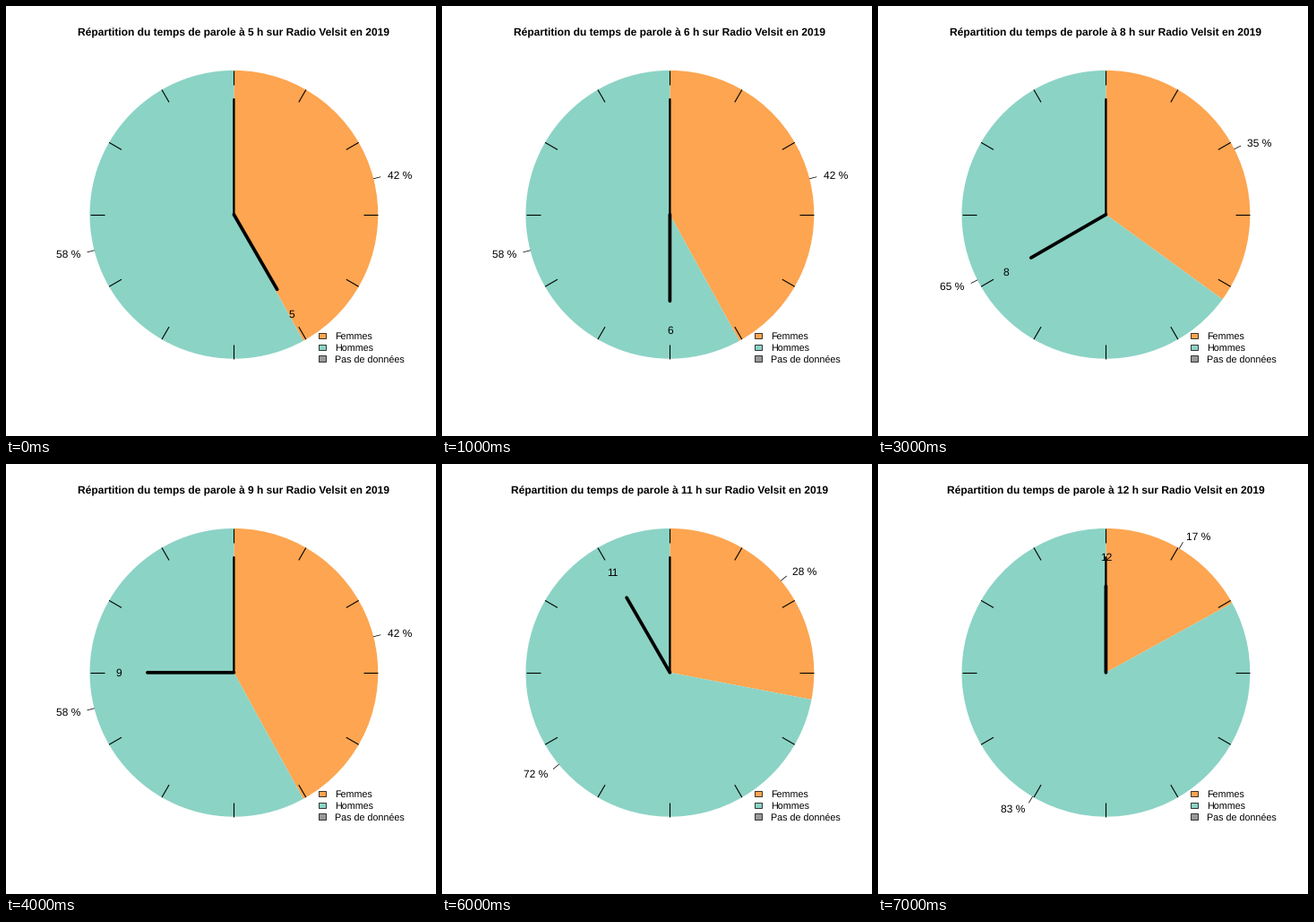
Animation of 480x480 px, one loop 8 s. Source, as a matplotlib script:

```python
import numpy as np
import matplotlib.pyplot as plt
from matplotlib.animation import FuncAnimation
from matplotlib.patches import Rectangle, Wedge

SIZE, DPI = 480, 100
PT = 72 / DPI  # points per pixel
CX, CY, R = 254.4, SIZE - 232.8, 160.9
ORANGE, TEAL, GREY = "#fda550", "#8bd3c5", "#999999"
FIRST_HOUR = 5
WOMEN = [42, 42, 36, 35, 42, 34, 28, 17]  # percent, one value per hour

plt.rcParams.update({"font.family": "Liberation Sans", "text.hinting": "none"})
fig = plt.figure(figsize=(SIZE / DPI, SIZE / DPI), dpi=DPI, facecolor="white")
ax = fig.add_axes([0, 0, 1, 1])
ax.set_xlim(0, SIZE)
ax.set_ylim(0, SIZE)
ax.axis("off")


def polar(turn, radius):
    """Point at a clockwise turn from the top, radius in units of the pie."""
    a = 2 * np.pi * turn
    return CX + R * radius * np.sin(a), CY + R * radius * np.cos(a)


def spoke(turn, inner, outer):
    return list(zip(polar(turn, inner), polar(turn, outer)))


def add_line(width, turn=0, inner=0, outer=1, cap="round", **kw):
    return ax.plot(*spoke(turn, inner, outer), color="black", lw=width * PT,
                   solid_capstyle=cap, **kw)[0]


def add_text(x, y, text="", size=12, **kw):
    return ax.text(x, y, text, fontsize=size * PT, va="baseline", **kw)


def add_wedge(color):
    wedge = Wedge((CX, CY), R, 0, 90, facecolor=color, lw=0)
    return ax.add_patch(wedge)


women, men = add_wedge(ORANGE), add_wedge(TEAL)
leaders = [add_line(0.75) for _ in range(2)]
shares = [add_text(0, 0, ha=side) for side in ("left", "right")]

for k in range(12):
    add_line(1.1, k / 12, 0.9, 1, cap="butt")
add_line(2.3, 0, 0, 0.8, snap=False)
hour_hand = add_line(3.75, 0, 0, 0.6, snap=False)
hour_label = add_text(0, 0, ha="center")
title = add_text(CX, SIZE - 34, ha="center", weight="bold")

legend = [(ORANGE, "Femmes"), (TEAL, "Hommes"), (GREY, "Pas de données")]
for i, (color, name) in enumerate(legend):
    y = SIZE - 367.8 - 12.96 * i
    ax.add_patch(Rectangle((349.3, y - 3.25), 7.8, 6.5, facecolor=color,
                           edgecolor="black", lw=0.75 * PT))
    add_text(366.8, y - 4, name, size=10.8)


def update(i):
    hour, pct = FIRST_HOUR + i, WOMEN[i]
    split = 90 - 3.6 * pct
    women.set_theta1(split)
    women.set_theta2(90)
    men.set_theta1(90)
    men.set_theta2(split + 360)

    middle = pct / 200
    for line, label, turn, value in zip(leaders, shares,
                                        (middle, middle + 0.5),
                                        (pct, 100 - pct)):
        line.set_data(*spoke(turn, 1, 1.05))
        x, y = polar(turn, 1.1)
        label.set_position((x, y - 4))
        label.set_text(f"{value} %")

    hour_hand.set_data(*spoke(hour / 12, 0, 0.6))
    x, y = polar(hour / 12, 0.8)
    hour_label.set_position((x, y - 4))
    hour_label.set_text(str(hour))
    title.set_text(f"Répartition du temps de parole à {hour} h "
                   "sur Radio Velsit en 2019")
    return []


anim = FuncAnimation(fig, update, frames=len(WOMEN), interval=1000,
                     repeat=True, repeat_delay=0, blit=False)
plt.show()
```
